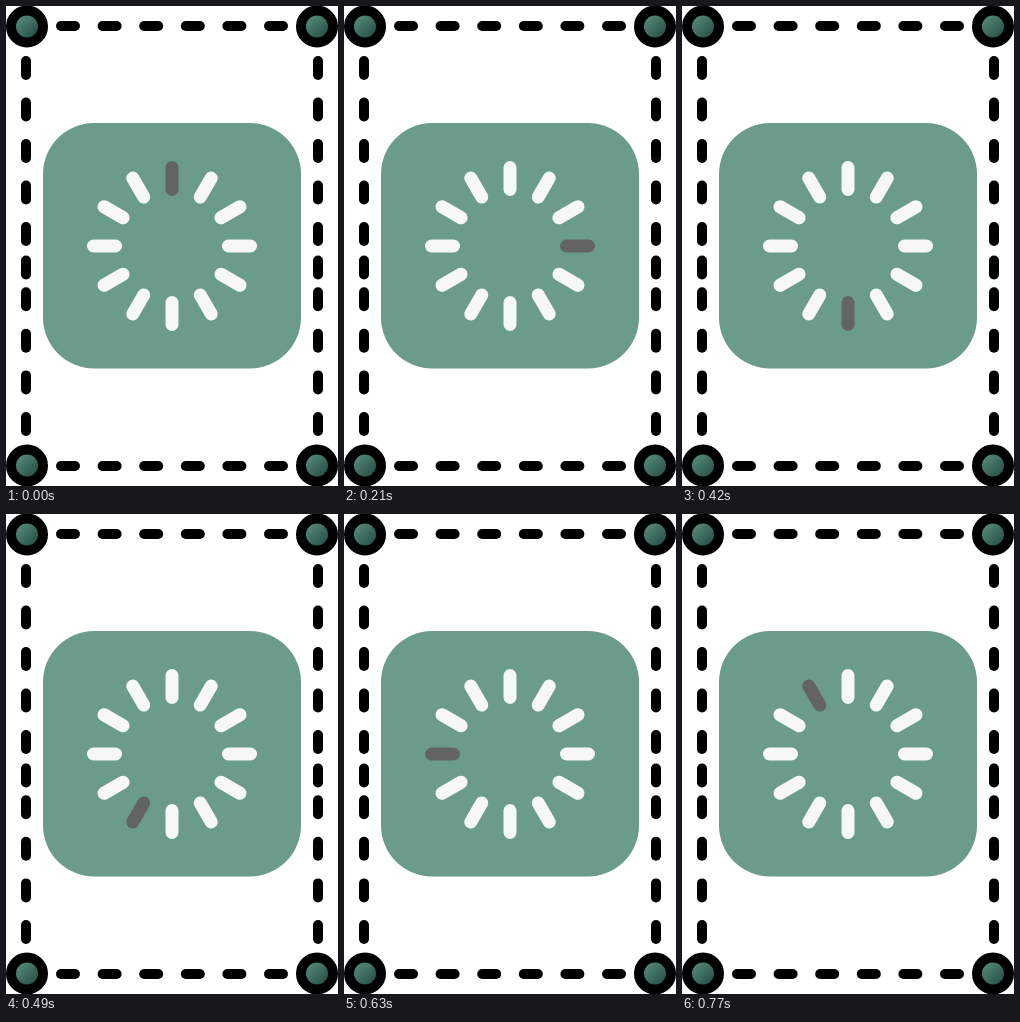
Write an HTML page that moves like this. It is 332 by 480 pixels and loops after 0.84 s.

```html
<!DOCTYPE html>
<html lang="en">
<head>
<meta charset="utf-8">
<title>Loading</title>
<style>
  html, body { margin: 0; width: 100%; height: 100%; overflow: hidden; background: #fff; }
  svg { display: block; width: 332px; height: 480px; }
</style>
</head>
<body>
<svg viewBox="0 0 332 480">
  <defs>
    <linearGradient id="knob" x1="0" y1="0" x2="1" y2="1">
      <stop offset=".1" stop-color="#5f9684"/>
      <stop offset=".9" stop-color="#1d443c"/>
    </linearGradient>
  </defs>
  <rect x="37" y="117" width="258" height="245.5" rx="51" fill="#6b9c89"/>
  <g id="border" stroke="#000" stroke-width="10" stroke-linecap="round"></g>
  <g id="corners" fill="url(#knob)" stroke="#000" stroke-width="10"></g>
  <g id="bars" stroke-width="13" stroke-linecap="round"></g>
</svg>
<script>
const STEP = 70, COUNT = 12;

function add(parentId, tag, attrs) {
  const el = document.createElementNS('http://www.w3.org/2000/svg', tag);
  for (const key in attrs) el.setAttribute(key, attrs[key]);
  return document.getElementById(parentId).appendChild(el);
}

const dash = (x1, y1, x2, y2) => add('border', 'line', { x1, y1, x2, y2 });

for (const y of [20, 460]) {
  for (let i = 0; i < 6; i++) {
    const x = 62 + i * 41.6;
    dash(x - 7, y, x + 7, y);
  }
}
for (const x of [20, 312]) {
  for (let i = 0; i < 5; i++) {
    const top = 62 + i * 41.5;
    dash(x, top - 7, x, top + 7);
    const bottom = i < 4 ? 418 - i * 41.6 : 261.5;
    dash(x, bottom - 7, x, bottom + 7);
  }
}
for (const cx of [21, 311])
  for (const cy of [20.5, 459.5]) add('corners', 'circle', { cx, cy, r: 16 });

const bars = Array.from({ length: COUNT }, (_, i) =>
  add('bars', 'path', {
    d: 'M0-56.5V-78.5',
    transform: `translate(166 240) rotate(${i * 360 / COUNT})`
  }));

function draw(now) {
  const active = Math.floor(now / STEP) % COUNT;
  bars.forEach((bar, i) => bar.setAttribute('stroke', i === active ? '#636363' : '#f7f7f7'));
}

const start = performance.now();
function tick() {
  draw(performance.now() - start);
  requestAnimationFrame(tick);
}
tick();
</script>
</body>
</html>
```
